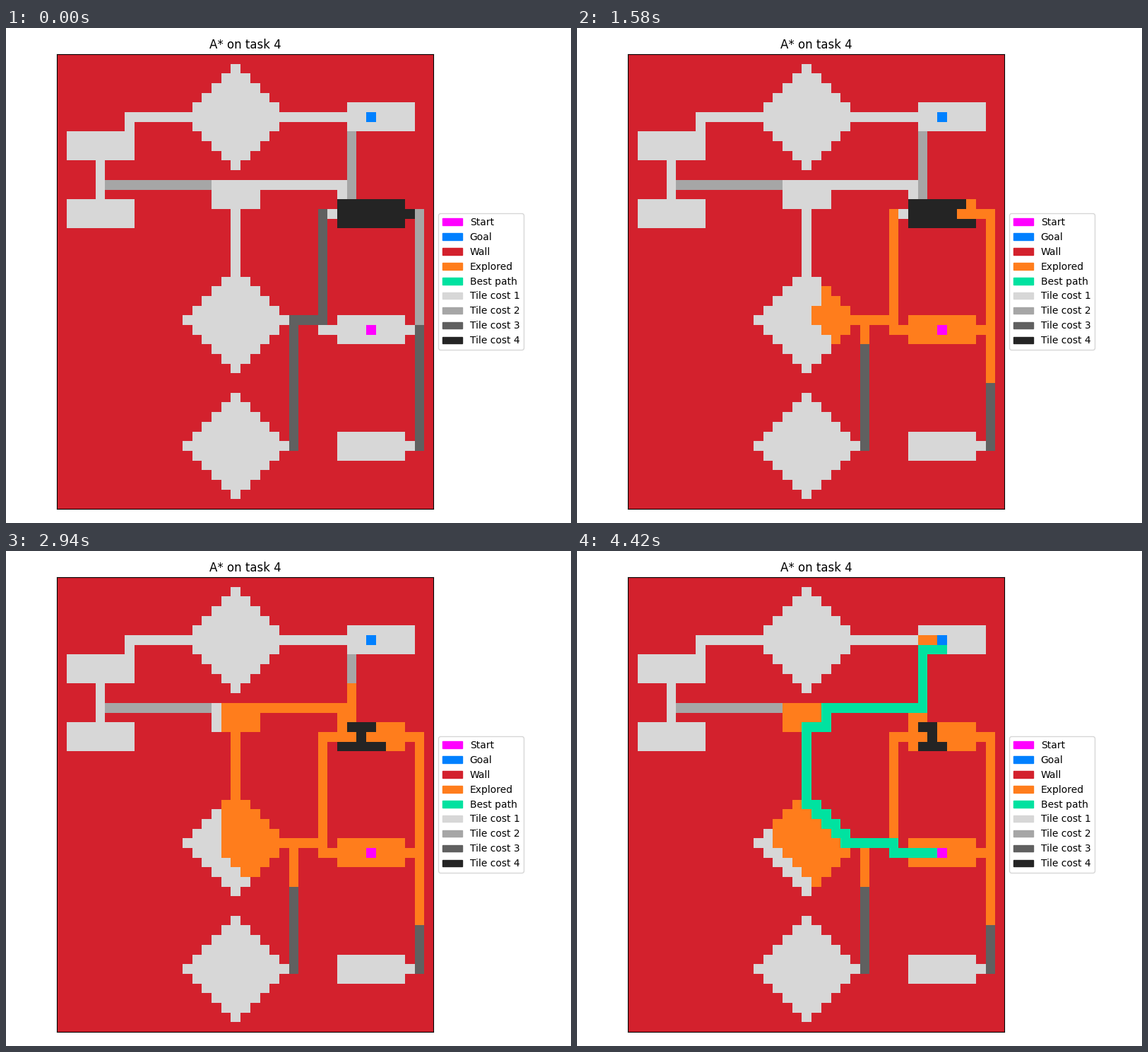
Animation of 800x700 px, one loop 5.42 s. Source, as a matplotlib script:

```python
import itertools

import numpy as np
import matplotlib.pyplot as plt
from matplotlib.animation import FuncAnimation
from matplotlib.patches import Patch

ROWS, COLS = 47, 39
START, GOAL = (28, 32), (6, 32)
STEP_MS, LOOP_MS = 20, 5420
MOVES = [(0, 1), (1, 0), (0, -1), (-1, 0)]

COLORS = {
    "Start": (255, 0, 255),
    "Goal": (0, 128, 255),
    "Wall": (211, 33, 45),
    "Explored": (255, 125, 28),
    "Best path": (0, 226, 160),
    "Tile cost 1": (215, 215, 215),
    "Tile cost 2": (166, 166, 166),
    "Tile cost 3": (96, 96, 96),
    "Tile cost 4": (36, 36, 36),
}


def build_map():
    """Grid of tile costs, where 0 is a wall."""
    grid = np.zeros((ROWS, COLS), int)
    r, c = np.indices(grid.shape)

    def fill(cost, top, bottom, left, right):
        grid[top:bottom + 1, left:right + 1] = cost

    for row in (6, 27, 40):
        grid[abs(r - row) + abs(c - 18) <= 5] = 1

    # rooms
    fill(1, 5, 7, 30, 36)
    fill(1, 8, 10, 1, 7)
    fill(1, 15, 17, 1, 7)
    fill(1, 13, 15, 16, 20)
    fill(4, 15, 17, 29, 35)
    fill(1, 27, 29, 29, 35)
    fill(1, 39, 41, 29, 35)

    # corridors
    fill(1, 6, 6, 7, 29)
    fill(1, 7, 7, 7, 7)
    fill(1, 11, 14, 4, 4)
    fill(2, 13, 13, 5, 15)
    fill(1, 13, 13, 21, 29)
    fill(1, 14, 14, 29, 29)
    fill(2, 8, 14, 30, 30)
    fill(1, 16, 22, 18, 18)
    fill(1, 16, 16, 28, 28)
    fill(4, 16, 16, 36, 36)
    fill(3, 16, 27, 27, 27)
    fill(3, 27, 27, 24, 27)
    fill(3, 28, 40, 24, 24)
    fill(1, 28, 28, 27, 28)
    fill(1, 28, 28, 36, 36)
    fill(2, 16, 27, 37, 37)
    fill(3, 28, 40, 37, 37)
    fill(1, 40, 40, 36, 36)
    return grid


def manhattan(cell):
    return abs(cell[0] - GOAL[0]) + abs(cell[1] - GOAL[1])


def a_star(grid):
    """Return the explored cells in order, and the path from goal to start."""
    ticket = itertools.count()
    cost, parent = {START: 0}, {}
    queue = [(manhattan(START), next(ticket), START)]
    closed = []
    while queue:
        entry = min(queue)
        queue.remove(entry)
        cell = entry[2]
        if cell == GOAL:
            break
        if cell in closed:
            continue
        closed.append(cell)
        for dr, dc in MOVES:
            near = (cell[0] + dr, cell[1] + dc)
            if not grid[near]:
                continue
            g = cost[cell] + int(grid[near])
            if g < cost.get(near, np.inf):
                cost[near], parent[near] = g, cell
                queue.append((g + manhattan(near), next(ticket), near))

    path = []
    cell = parent[GOAL]
    while cell != START:
        path.append(cell)
        cell = parent[cell]
    return closed[1:], path


grid = build_map()
explored, path = a_star(grid)
changes = ([(cell, COLORS["Explored"]) for cell in explored]
           + [(cell, COLORS["Best path"]) for cell in path])

palette = np.array([COLORS["Wall"]]
                   + [COLORS[f"Tile cost {k}"] for k in range(1, 5)], np.uint8)
base = palette[grid]
base[START] = COLORS["Start"]
base[GOAL] = COLORS["Goal"]

fig = plt.figure(figsize=(8, 7), dpi=100, facecolor="white")
ax = fig.add_axes([71.9 / 800, 20.1 / 700, 533.4 / 800, 642.8 / 700])
image = ax.imshow(base, interpolation="nearest", aspect="auto")
ax.set_xticks([])
ax.set_yticks([])
ax.set_title("A* on task 4")
ax.legend(handles=[Patch(color=np.array(rgb) / 255, label=name)
                   for name, rgb in COLORS.items()],
          loc="center left", bbox_to_anchor=(1, 0.5))


def update(i):
    # The first picture stays for two ticks; the last one is held.
    frame = base.copy()
    for cell, rgb in changes[:max(0, i - 1)]:
        frame[cell] = rgb
    image.set_data(frame)
    return [image]


anim = FuncAnimation(fig, update, frames=LOOP_MS // STEP_MS,
                     interval=STEP_MS, repeat=True, repeat_delay=0)
plt.show()
```
